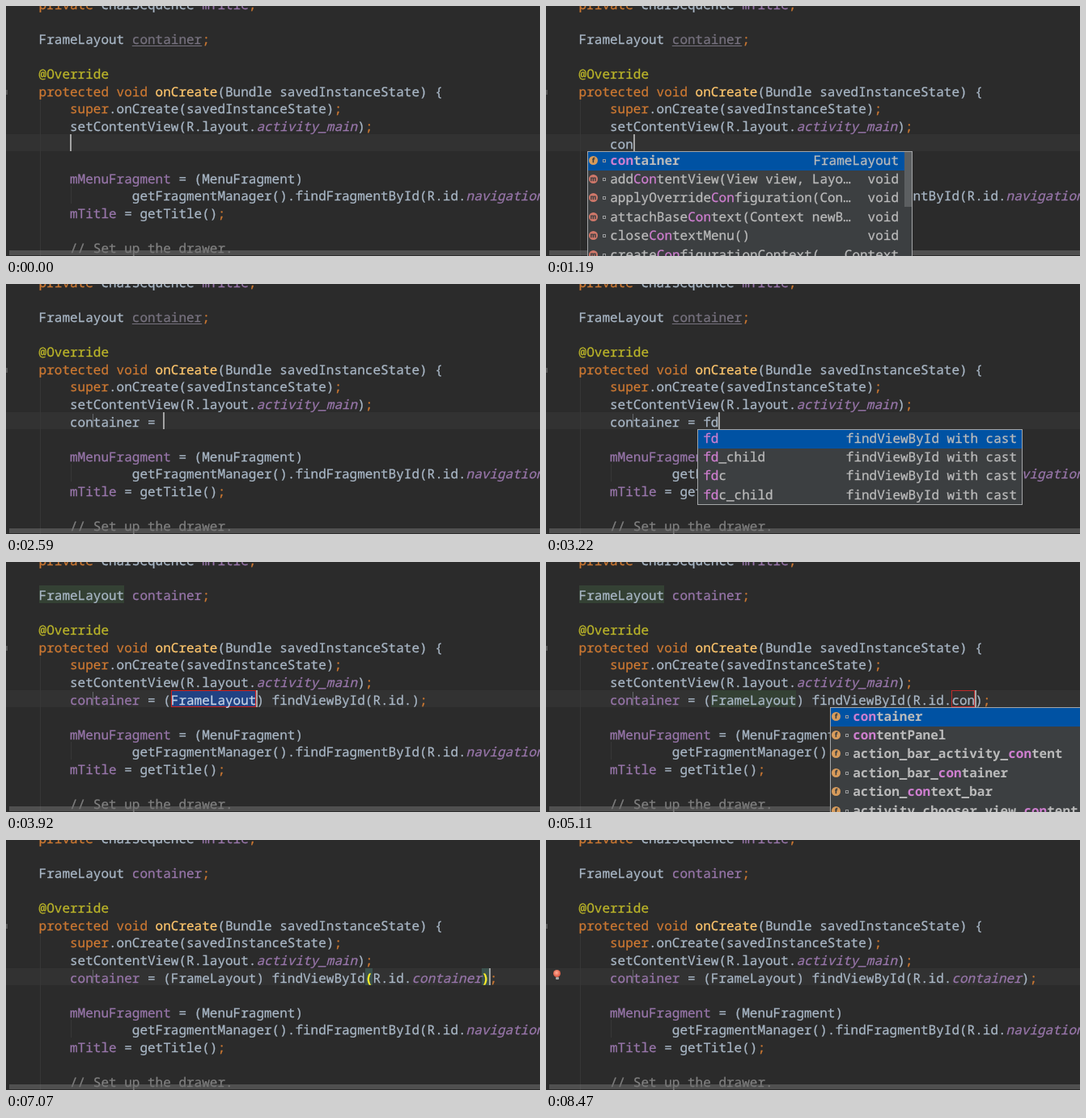
Animation, 660 px wide and 310 px high, one loop 8540 ms. Source, as an HTML page:

```html
<!DOCTYPE html>
<html lang="en">
<head>
<meta charset="utf-8">
<title>Live template in a code editor</title>
<style>
  html, body { margin: 0; width: 100%; height: 100%; overflow: hidden; background: #2b2b2b; }
  #stage { position: relative; width: 660px; height: 310px; overflow: hidden; background: #2b2b2b;
    color: #a9b7c6; font: 16px "Noto Sans Mono", "DejaVu Sans Mono", monospace;
    -webkit-text-stroke: .25px currentColor;
    font-variant-ligatures: none; text-rendering: geometricPrecision; }
  #stage div { position: absolute; box-sizing: border-box; white-space: pre; }
  .line { line-height: 21.6px; }
  .kw { color: #cc7832; }
  .fn { color: #ffc66d; }
  .an { color: #bbb529; }
  .fd { color: #9876aa; }
  .cm { color: #808080; }
  .it { color: #9876aa; font-style: italic; }
  .un { color: #77727f; text-decoration: underline; text-underline-offset: 2px; }
  .br { color: #ffef28; font-weight: bold; }
  .sel { color: #c3d3e6; }
  .popup { overflow: hidden; background: #3c3f41; color: #bbb; border: 1px solid #a4a6a8; }
  .item { left: 0; right: 0; height: 23.4px; line-height: 23.4px; }
  .item div { top: -1px; }
  .on { background: #0052a3; }
  .bold .name { font-weight: bold; -webkit-text-stroke: 0; }
  .hit { color: #cf7fd0; }
  .dot { width: 11px; height: 11px; border-radius: 6px; font: bold 8px/11px "Noto Sans", sans-serif;
    text-align: center; color: #3c3f41; }
  .lock { width: 4px; height: 4px; border: 1px solid #9a9c9e; }
  .dim { color: #8c8d8e; }
  .dim .hit { color: #9b64a2; }
  .dim .on { background: #484b4d; }
  .dim .dot { opacity: .75; }
</style>
</head>
<body>
<div id="stage"></div>
<script>
const LOOP = 8540, CW = 9.6, X0 = 40.6, ROW = 21.58, ITEM = 23.4;
const stage = document.getElementById('stage');

const colX = c => X0 + c * CW;
const rowY = r => r * ROW - 14.1;
const tag = (cls, s) => `<span class="${cls}">${s}</span>`;
const kw = s => tag('kw', s), fd = s => tag('fd', s), it = s => tag('it', s);
const rect = (x, y, w, h, css) =>
  `<div style="left:${x}px;top:${y}px;width:${w}px;height:${h}px;${css}"></div>`;
const line = (row, col, html) =>
  `<div class="line" style="left:${colX(col)}px;top:${rowY(row) + 2}px">${html}</div>`;
const mark = (row, col, len, css) => rect(colX(col), rowY(row), len * CW, ROW, css);

const members = [
  ['container', 'FrameLayout', 'f'],
  ['addContentView(View view, Layo…', 'void', 'm'],
  ['applyOverrideConfiguration(Con…', 'void', 'm'],
  ['attachBaseContext(Context newB…', 'void', 'm'],
  ['closeContextMenu()', 'void', 'm'],
  ['createConfigurationContext(…', 'Context', 'm']
];
const templates = ['fd', 'fd_child', 'fdc', 'fdc_child'].map(n => [n, 'findViewById with cast']);
const toIds = names => names.map(n => [n, '', 'f']);
const allIds = toIds(['container', 'drawer_layout', 'navigation_drawer', 'action_bar',
  'action_bar_activity_content', 'action_bar_container']);
const conIds = toIds(['container', 'contentPanel', 'action_bar_activity_content',
  'action_bar_container', 'action_context_bar', 'activity_chooser_view_content']);

const popups = {
  members: { x: 51, w: 402, right: 16, thumb: true, list: members, boldFirst: true },
  templates: { x: 187, w: 402, right: 6, list: templates },
  allIds: { x: 351, w: 320, list: allIds, bold: true },
  conIds: { x: 351, w: 320, list: conIds, bold: true }
};

function popup(key, prefix, dim) {
  const p = popups[key], icons = !!p.list[0][2];
  const rows = p.list.map(([name, type, icon], i) => {
    const at = prefix ? name.toLowerCase().indexOf(prefix) : -1;
    const end = at + prefix.length;
    const text = at < 0 ? name : name.slice(0, at) + tag('hit', name.slice(at, end)) + name.slice(end);
    const bold = p.bold || (p.boldFirst && !i) ? ' bold' : '';
    const color = icon === 'm' ? '#d0786a' : '#d79b5b';
    return `<div class="item${i ? '' : ' on'}${bold}" style="top:${i * ITEM}px">` +
      (icon ? `<div class="dot" style="left:1px;top:5px;background:${color}">${icon}</div>
        <div class="lock" style="left:18px;top:9px"></div>` : '') +
      `<div class="name" style="left:${icons ? 27.2 : 6.2}px">${text}</div>` +
      `<div style="right:${p.right || 0}px">${type}</div></div>`;
  }).join('');
  const thumb = p.thumb ? rect(391, 0, 9, 68, 'background:#5c5f61') : '';
  return `<div class="popup${dim ? ' dim' : ''}" style="left:${p.x}px;top:179.5px;width:${p.w}px;` +
    `height:${p.list.length * ITEM + 1}px">${rows}${thumb}</div>`;
}

// Each step overrides the fields of the one before it.
const steps = [
  [0, { text: '', caret: 4 }],
  [140, { caret: 0 }],
  [560, { caret: 4 }],
  [1050, { text: 'c', caret: 5 }],
  [1120, { text: 'co', caret: 6, popup: 'members', prefix: 'co' }],
  [1190, { text: 'con', caret: 7, prefix: 'con' }],
  [1890, { dim: true }],
  [2100, { text: 'container', caret: 13, popup: '', dim: false, pointer: true }],
  [2380, { text: 'container ', caret: 14 }],
  [2450, { text: 'container =', caret: 15 }],
  [2590, { text: 'container = ', caret: 16 }],
  [2870, { text: 'container = f', caret: 17 }],
  [2940, { popup: 'templates', prefix: 'f' }],
  [3010, { text: 'container = fd', caret: 18, prefix: 'fd' }],
  [3360, { cast: true, id: '', tail: ';', caret: 28, popup: '', selected: true }],
  [3920, { used: true, usages: true }],
  [4480, { selected: false, editId: true, caret: 48 }],
  [4550, { popup: 'allIds', prefix: '' }],
  [5040, { id: 'co', caret: 50, popup: 'conIds', prefix: 'co' }],
  [5110, { id: 'con', caret: 51, prefix: 'con' }],
  [5460, { id: 'container', caret: 57, popup: '' }],
  [5530, { editId: false, caret: 58, braces: true }],
  [5880, { tail: ';;', caret: 59, braces: false, usages: false }],
  [6020, { resolved: true }],
  [6650, { tail: ';', caret: 58, braces: true }],
  [7490, { bulb: true }],
  [7770, { caret: 0, braces: false }]
];
let last = {};
const states = steps.map(([at, change]) => (last = { ...last, ...change, at }));

function editedLine(s) {
  if (!s.cast) return s.text;
  const brace = c => s.braces ? tag('br', c) : c;
  const type = s.selected ? tag('sel', 'FrameLayout') : 'FrameLayout';
  return (s.used ? fd('container') : 'container') + ` = (${type}) findViewById` + brace('(') +
    'R.id.' + (s.resolved ? it(s.id) : s.id) + brace(')') + kw(s.tail);
}

const fixedLines = [
  line(0, 0, kw('private') + ' CharSequence ' + fd('mTitle') + kw(';')),
  line(4, 0, tag('an', '@Override')),
  line(5, 0, kw('protected void ') + tag('fn', 'onCreate') + '(Bundle savedInstanceState) {'),
  line(6, 4, kw('super') + '.onCreate(savedInstanceState)' + kw(';')),
  line(7, 4, 'setContentView(R.layout.' + it('activity_main') + ')' + kw(';')),
  line(10, 4, fd('mMenuFragment') + ' = (MenuFragment)'),
  line(11, 12, 'getFragmentManager().findFragmentById(R.id.' + it('navigation_drawer') + ')' + kw(';')),
  line(12, 4, fd('mTitle') + ' = getTitle()' + kw(';')),
  line(14, 4, tag('cm', '// Set up the drawer.'))
].join('');

function marks(s) {
  let out = '';
  const green = 'background:#344134';
  if (s.usages) out += mark(2, 0, 11, green) + mark(8, 17, 11, green);
  if (s.selected) out += mark(8, 17, 11, 'background:#214283;border:1px solid #d02020');
  if (s.editId) out += mark(8, 48, Math.max(s.id.length, .2), 'border:1px solid #c02a2a');
  if (s.braces) out += [42, 57].map(c => mark(8, c, 1, 'background:#3b514d')).join('');
  return out;
}

const bulb =
  rect(9, 160.5, 9, 9, 'border-radius:5px;background:radial-gradient(circle at 45% 40%,#ffb09a,#e2604a 60%)') +
  rect(11.5, 169.5, 4, 3.5, 'background:#a5a5a5;border-radius:1px');

function draw(s) {
  stage.innerHTML =
    rect(0, rowY(8), 660, ROW, 'background:#323232') +
    rect(42, rowY(6), 1, 200, 'background:#373737') +
    rect(80, rowY(11), 1, ROW, 'background:#373737') +
    rect(0, 104, 1.5, 6, 'background:#555') +
    marks(s) + fixedLines +
    line(2, 0, 'FrameLayout ' + tag(s.used ? 'fd' : 'un', 'container') + kw(';')) +
    line(8, 4, editedLine(s)) +
    (s.pointer ? rect(107, 161, 1, 17, 'background:#949aa0;opacity:.5') : '') +
    (s.caret ? rect(Math.round(colX(s.caret)), rowY(8), 2, ROW, 'background:#a4a4a4') : '') +
    (s.bulb ? bulb : '') +
    rect(4, 303, 656, 6, 'background:rgba(112,112,112,.55)') +
    (s.popup ? popup(s.popup, s.prefix, s.dim) : '');
}

const start = performance.now();
let shown = null;
function tick() {
  const t = (performance.now() - start) % LOOP;
  const s = states.findLast(state => state.at <= t) || states[0];
  if (s !== shown) draw(shown = s);
  requestAnimationFrame(tick);
}
tick();
</script>
</body>
</html>
```
